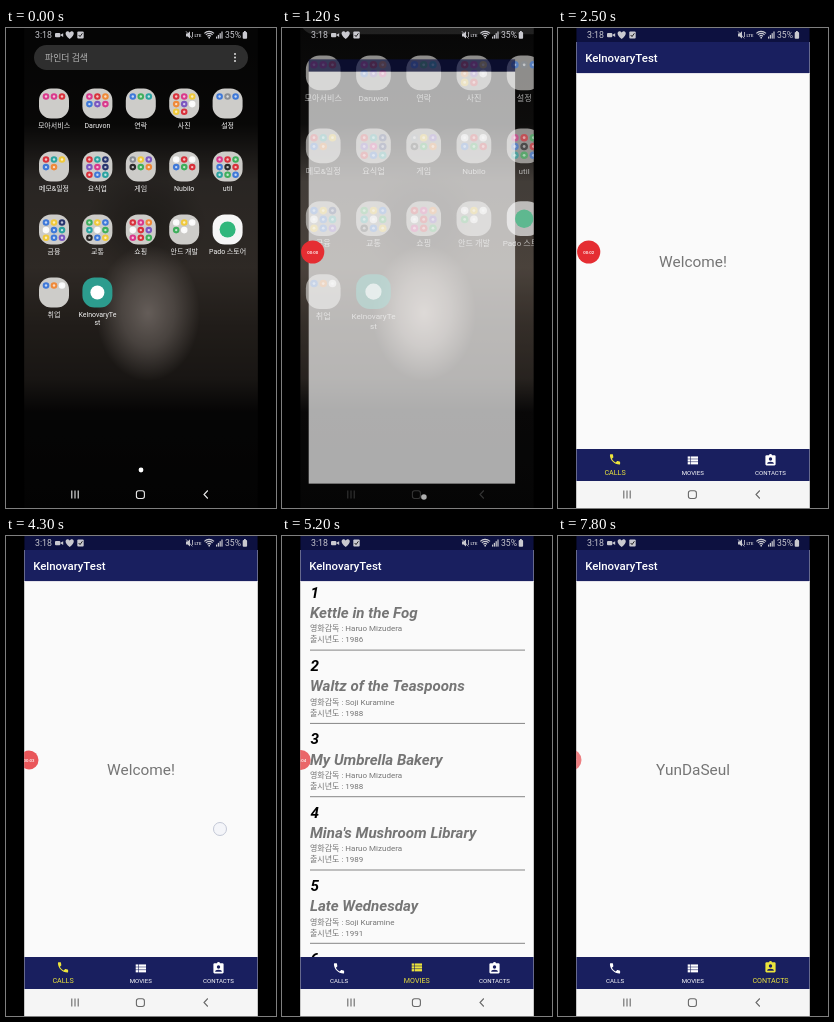
These frames come from a looping animation (270 by 480 pixels, 8 s). An HTML page with a canvas:

```html
<!DOCTYPE html>
<html lang="ko">
<head>
<meta charset="utf-8">
<title>Phone demo</title>
<style>
html, body { margin: 0; width: 100%; height: 100%; overflow: hidden; background: #000; }
canvas { display: block; width: 270px; height: 480px; }
</style>
</head>
<body>
<canvas id="stage"></canvas>
<script>
const LOOP = 8000, W = 270, H = 480, LEFT = 18.25, RIGHT = 251.75, PAGE = RIGHT - LEFT;
const NAVY = '#191f5f', DARK = '#0d1140', PAPER = '#fafafa', GREY = '#757575', GOLD = '#ece43c';
const SANS = 'Roboto, "Noto Sans CJK KR", "Noto Sans CJK", sans-serif';
const PIVOT = { x: 91, y: 270 };

const canvas = document.getElementById('stage');
const dpr = window.devicePixelRatio || 1;
canvas.width = W * dpr;
canvas.height = H * dpr;
const c = canvas.getContext('2d');

const clamp = v => Math.max(0, Math.min(1, v));
const mix = (a, b, k) => a + (b - a) * k;
const span = (t, a, b) => clamp((t - a) / (b - a));
const smooth = k => k * k * (3 - 2 * k);
const grey = v => `rgb(${v},${v},${v})`;

function rect(x, y, w, h, fill) {
  c.fillStyle = fill;
  c.fillRect(x, y, w, h);
}
function disc(x, y, r, fill) {
  c.fillStyle = fill;
  c.beginPath();
  c.arc(x, y, r, 0, Math.PI * 2);
  c.fill();
}
function pill(x, y, w, h, r, fill) {
  c.fillStyle = fill;
  c.beginPath();
  c.roundRect(x, y, w, h, r);
  c.fill();
}
function line(points, color, width) {
  c.strokeStyle = color;
  c.lineWidth = width;
  c.beginPath();
  points.forEach(([x, y]) => c.lineTo(x, y));
  c.stroke();
}
function text(str, x, y, size, fill, align = 'left', style = '') {
  c.font = `${style} ${size}px ${SANS}`;
  c.textAlign = align;
  c.fillStyle = fill;
  c.fillText(str, x, y);
}
function layer(alpha, draw) {
  c.save();
  c.globalAlpha *= alpha;
  draw();
  c.restore();
}
function zoom(scale) {
  c.translate(PIVOT.x, PIVOT.y);
  c.scale(scale, scale);
  c.translate(-PIVOT.x, -PIVOT.y);
}

// ---------- app drawer ----------
const DOTS = {
  r: '#d8323c', m: '#d93a8c', o: '#ef8a3a', y: '#f0c93c', g: '#3fae5c', b: '#3f79d8',
  n: '#28356e', t: '#2ba3a0', w: '#fafafa', k: '#2a2a2a', v: '#7b58c0', e: '#8a8f96'
};
const FOLDERS = [
  ['모아서비스', 'mmr'], ['Daruvon', 'mrobvm'], ['연락', 'bgt'], ['사진', 'rmyovwyr'], ['설정', 'beb'],
  ['메모&일정', 'rtybo'], ['요식업', 'rtnvmnrbt'], ['게임', 'eyvkgo'], ['Nubilo', 'wrwbgr'], ['util', 'mrgbkrtgb'],
  ['금융', 'bynwbtybv'], ['교통', 'gybtwgkby'], ['쇼핑', 'rmowrvmrg'], ['안드 개발', 'wywgw'], ['Pado 스토어', ''],
  ['취업', 'bow'], ['KelnovaryTe', '']
];

function folder([name, dots], i) {
  const x = 48 + (i % 5) * 43.4, y = 75.5 + Math.floor(i / 5) * 63;
  const fill = dots ? '#cdccc9' : i === 16 ? '#2c9c8e' : '#f6f6f6';
  pill(x - 15, y - 15, 30, 30, 12, fill);
  [...dots].forEach((d, k) => {
    const dx = x - 8 + (k % 3) * 8, dy = y - 7 + Math.floor(k / 3) * 7.6;
    disc(dx, dy, 3.3, DOTS[d]);
    disc(dx, dy, 1.2, 'rgba(255,255,255,.7)');
  });
  if (i === 14) disc(x, y, 8, '#31b77c');
  if (i === 16) disc(x, y, 7, '#fff');
  text(name, x, y + 24, 7, '#f2f2f2', 'center');
  if (i === 16) text('st', x, y + 32.5, 7, '#f2f2f2', 'center');
}

// Soft elliptical spot of light or shade
function spot(x, y, rx, ry, rgb, alpha) {
  c.save();
  c.translate(x, y);
  c.scale(rx, ry);
  const g = c.createRadialGradient(0, 0, 0, 0, 0, 1);
  g.addColorStop(0, `rgba(${rgb},${alpha})`);
  g.addColorStop(.5, `rgba(${rgb},${alpha * .6})`);
  g.addColorStop(1, `rgba(${rgb},0)`);
  disc(0, 0, 1, g);
  c.restore();
}
function wallpaper(dim) {
  const g = c.createLinearGradient(0, 0, 0, H);
  [[0, '#0a0a0a'], [.2, '#121110'], [.32, '#59524c'], [.5, '#645950'], [.62, '#473e37'], [.73, '#352f2a'], [.8, '#0c0b0b'], [1, '#070707']]
    .forEach(([k, col]) => g.addColorStop(k, col));
  rect(LEFT, 0, PAGE, H, g);
  spot(140, 195, 60, 55, '20,17,15', .35);
  spot(142, 285, 52, 68, '235,218,208', .9);
  rect(LEFT, 0, PAGE, H, `rgba(0,0,0,${dim})`);
}

function drawer() {
  pill(28, 17, 214, 25, 12.5, '#2e2e2e');
  text('파인더 검색', 39, 33, 8.9, '#b4b4b4');
  [26, 29.5, 33].forEach(y => disc(229, y, 1, '#ddd'));
  FOLDERS.forEach(folder);
  disc(135, 442, 2.4, '#fff');
}

// ---------- system bars ----------
function statusBar() {
  const ink = '#c9c9cf';
  text('3:18', 29, 10.3, 8.8, ink);
  pill(49, 5, 5.3, 4.2, 1, ink);
  c.beginPath();
  c.moveTo(54, 7.1); c.lineTo(57.2, 5.2); c.lineTo(57.2, 9);
  c.fill();
  c.beginPath();
  c.moveTo(63.7, 11);
  c.bezierCurveTo(56, 5.5, 61, .8, 63.7, 4.6);
  c.bezierCurveTo(66.4, .8, 71.4, 5.5, 63.7, 11);
  c.fill();
  pill(71.3, 3.5, 6.4, 7, 1, ink);
  line([[72.7, 7], [74, 8.6], [76.4, 5.3]], '#222', 1);
  // muted speaker
  c.fillStyle = ink;
  c.beginPath();
  [[180, 5.5], [181.6, 5.5], [184, 3.2], [184, 10.6], [181.6, 8.5], [180, 8.5]].forEach(p => c.lineTo(...p));
  c.fill();
  line([[180, 3.3], [186.4, 10.4]], ink, .8);
  line([[186.5, 4], [186.5, 9]], ink, .8);
  text('LTE', 188.5, 8.8, 4.2, ink, 'left', 'bold');
  c.strokeStyle = ink;
  c.lineWidth = 1.1;
  [2.4, 4.6, 6.6].forEach(r => {
    c.beginPath();
    c.arc(203.2, 10, r, -Math.PI * .76, -Math.PI * .24);
    c.stroke();
  });
  disc(203.2, 9.7, .9, ink);
  for (let i = 0; i < 4; i++) rect(210 + i * 1.8, 8.6 - i * 1.7, 1.2, 2 + i * 1.7, ink);
  text('35%', 219, 10.3, 8.6, ink);
  pill(236.7, 4, 4.4, 6.8, 1, ink);
  rect(238, 3, 1.8, 1.2, ink);
}

function navKeys(t) {
  const lit = span(t, 1250, 1500);
  rect(LEFT, 453, PAGE, 27, `rgba(245,245,245,${lit})`);
  const ink = grey(Math.round(mix(mix(235, 52, span(t, 1000, 1200)), 105, lit)));
  [65.8, 69, 72.2].forEach(x => line([[x, 462.5], [x, 470.5]], ink, 1.1));
  c.beginPath();
  c.roundRect(130.4, 462.7, 8, 7.8, 2.2);
  c.stroke();
  line([[201.8, 462.5], [198, 466.5], [201.8, 470.5]], ink, 1.1);
}

// ---------- app ----------
const FILMS = [
  ['Kettle in the Fog', 0, 1986], ['Waltz of the Teaspoons', 1, 1988], ['My Umbrella Bakery', 0, 1988],
  ["Mina's Mushroom Library", 0, 1989], ['Late Wednesday', 1, 1991], ['', 0, 1992]
];
const MAKERS = ['Haruo Mizudera', 'Soji Kuramine'];
const PHONE = new Path2D('M6.62 10.79c1.44 2.83 3.76 5.14 6.59 6.59l2.2-2.2c.27-.27.67-.36 1.02-.24 1.12.37 2.33.57 3.57.57.55 0 1 .45 1 1V20c0 .55-.45 1-1 1-9.39 0-17-7.61-17-17 0-.55.45-1 1-1h3.5c.55 0 1 .45 1 1 0 1.25.2 2.45.57 3.57.11.35.03.74-.25 1.02l-2.2 2.2z');

function phoneIcon(ink) {
  c.fillStyle = ink;
  c.fill(PHONE);
}
function listIcon(ink) {
  [5, 10, 15].forEach(y => {
    rect(3, y, 4.2, 4, ink);
    rect(8.2, y, 13, 4, ink);
  });
}
function cardIcon(ink) {
  pill(3, 3, 18, 18, 2, ink);
  disc(12, 3.4, 2.6, ink);
  disc(12, 9.5, 3, NAVY);
  c.beginPath();
  c.ellipse(12, 18, 6, 3.6, 0, Math.PI, 0);
  c.fill();
}
const TABS = [['CALLS', phoneIcon, 57], ['MOVIES', listIcon, 134.8], ['CONTACTS', cardIcon, 212.5]];

function films() {
  FILMS.forEach(([title, maker, year], i) => {
    const y = i * 73.3;
    text(i + 1, 28.5, 61.8 + y, 15.2, '#000', 'left', 'italic bold');
    text(title, 28, 82 + y, 15.1, GREY, 'left', 'italic bold');
    text('영화감독 : ' + MAKERS[maker], 28, 95.4 + y, 8, GREY);
    text('출시년도 : ' + year, 28, 106.3 + y, 8, GREY);
    rect(28, 113.6 + y, 215, 1, '#858585');
  });
}

// Drag left with a finger, then settle on the next page.
const SWIPES = [
  { down: 4300, up: 4650, settle: 5050, x0: 214, x1: 140, y0: 293, y1: 284 },
  { down: 6450, up: 6800, settle: 7200, x0: 192, x1: 127, y0: 284, y1: 277 }
];
function drag(s, t) {
  const k = span(t, s.down, s.up) ** 1.5;
  return { x: mix(s.x0, s.x1, k), y: mix(s.y0, s.y1, k) };
}
function scrolled(s, t) {
  const pull = Math.max(0, s.x0 - drag(s, t).x - 9);
  return mix(pull, PAGE, 1 - (1 - span(t, s.up, s.settle)) ** 5);
}

function app(t) {
  rect(LEFT, 14, PAGE, 439, PAPER);
  const shift = SWIPES.reduce((sum, s) => sum + scrolled(s, t), 0);
  c.save();
  c.beginPath();
  c.rect(LEFT, 45, PAGE, 376);
  c.clip();
  c.translate(-shift, 0);
  text('Welcome!', 135, 239, 15.4, GREY, 'center');
  c.translate(PAGE, 0);
  films();
  c.translate(PAGE, 0);
  text('YunDaSeul', 135, 239, 15.4, GREY, 'center');
  c.restore();

  rect(LEFT, 14, PAGE, 31, NAVY);
  rect(LEFT, 45, PAGE, 1, '#e4e2ea');
  text('KelnovaryTest', 27.2, 34, 11.4, '#fff', 'left', '500');
  rect(LEFT, 421, PAGE, 32, NAVY);
  const active = SWIPES.filter(s => t >= s.up).length;
  TABS.forEach(([label, icon, x], i) => {
    const on = i === active, ink = on ? GOLD : '#fff';
    c.save();
    c.translate(x - 6.8, on ? 424.6 : 425.6);
    c.scale(.567, .567);
    icon(ink);
    c.restore();
    text(label, x, 447.3, on ? 7.15 : 6.1, ink, 'center');
  });
}

function launchWindow() {
  rect(LEFT, 0, PAGE, 14, DARK);
  rect(LEFT, 14, PAGE, H - 14, PAPER);
}

// ---------- overlays ----------
function bubble(t) {
  const a = smooth(span(t, 2500, 2900)), b = smooth(span(t, 5000, 5450));
  const x = 30.7 - 7.7 * a - 10 * b, r = 11.6 - 2.1 * a + b;
  const shown = span(t, 100, 300);
  layer(shown * (1 - .2 * a - .2 * b), () => disc(x, 224, r, '#e52d32'));
  const sec = Math.max(0, Math.floor((t - 400) / 1000));
  layer(shown, () => text('00:0' + sec, x, 225.6, 4.3, '#fff', 'center', '500'));
}

function touch(t) {
  const s = SWIPES.find(s => t >= s.down && t < s.up);
  if (!s) return;
  const { x, y } = drag(s, t);
  disc(x, y, 6.5, 'rgba(240,242,248,.6)');
  c.strokeStyle = '#c3c8d6';
  c.lineWidth = 1;
  c.stroke();
}

function draw(t) {
  c.setTransform(dpr, 0, 0, dpr, 0, 0);
  rect(0, 0, W, H, '#000');
  c.save();
  c.beginPath();
  c.rect(LEFT, 0, PAGE, H);
  c.clip();

  const p = span(t, 950, 1440), grow = 1 - (1 - p) ** 3;
  if (p < 1) {
    wallpaper(.54 * (1 - p));
    layer(1 - p ** 1.7, () => { zoom(1 + .178 * grow); drawer(); });
  }
  if (p > 0) layer(clamp(p * 1.33), () => { zoom(grow); launchWindow(); });
  if (t >= 1900) app(t);
  navKeys(t);
  statusBar();
  touch(t);
  bubble(t);
  c.restore();
}

function frame(now) {
  draw(now % LOOP);
  requestAnimationFrame(frame);
}
draw(0);
requestAnimationFrame(frame);
</script>
</body>
</html>
```
